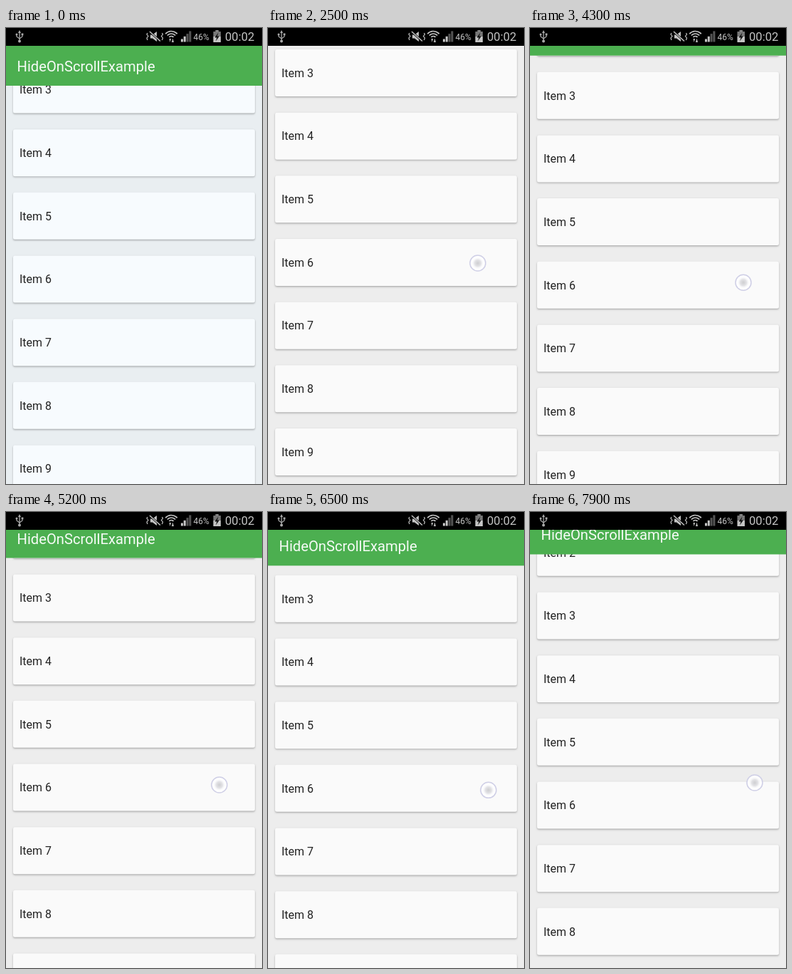
Recreate the animation shown at these times as an HTML page with a canvas. Size 360 by 640 pixels, loop 8 s.

```html
<!DOCTYPE html>
<html lang="en">
<head>
<meta charset="utf-8">
<title>HideOnScrollExample</title>
<style>
html, body { margin: 0; width: 100%; height: 100%; overflow: hidden; background: #ededed; }
canvas { display: block; width: 360px; height: 640px; }
</style>
</head>
<body>
<canvas id="stage" width="360" height="640"></canvas>
<script>
const ctx = document.getElementById('stage').getContext('2d');
const W = 360, H = 640, LOOP = 8000, STEP = 100;
const STATUS_H = 25, BAR_H = 56, SLOP = 8, SNAP_MS = 300;
const CARD_H = 66, PITCH = 88.67, START_Y = 86.5;
const FONT = 'Roboto, "Noto Sans", sans-serif';

// Drags: dy is finger travel, snap is the bar offset reached after release.
const drags = [
  { from: 900,  to: 1775, x: 288, y: 411,   dy: -31.5, pow: 1,    snap: BAR_H },
  { from: 2500, to: 3350, x: 295, y: 330,   dy: 26,    pow: 1,    snap: BAR_H },
  { from: 3700, to: 5625, x: 300, y: 335.5, dy: 54.5,  pow: 1.36, snap: 0 },
  { from: 6000, to: 6896, x: 310, y: 404,   dy: -24.5, pow: 1,    snap: BAR_H },
  { from: 7230, to: 8000, x: 316, y: 337.5, dy: 48.8,  pow: 1,    snap: 0 }
];

const clamp = (v, lo, hi) => Math.min(hi, Math.max(lo, v));
const decelerate = u => 1 - Math.pow(1 - clamp(u, 0, 1), 4);

function poseAt(t) {
  let listY = START_Y, hidden = 0, touch = null;
  for (const d of drags) {
    if (t < d.from) break;
    const u = clamp((t - d.from) / (d.to - d.from), 0, 1);
    const moved = d.dy * (1 - Math.pow(1 - u, d.pow));
    const scrolled = Math.sign(moved) * Math.max(0, Math.abs(moved) - SLOP);
    listY += scrolled;
    hidden = clamp(hidden - scrolled, 0, BAR_H);
    if (t < d.to) touch = { x: d.x, y: d.y + moved };
    else hidden += (d.snap - hidden) * decelerate((t - d.to) / SNAP_MS);
  }
  return { listY, hidden, touch };
}

function rect(x, y, w, h, color) {
  ctx.fillStyle = color;
  ctx.fillRect(x, y, w, h);
}

function label(str, x, y, size, color) {
  ctx.font = size + 'px ' + FONT;
  ctx.fillStyle = color;
  ctx.fillText(str, x, y);
}

function trace(points) {
  ctx.beginPath();
  points.forEach(([x, y]) => ctx.lineTo(x, y));
}

function line(points, color, width) {
  trace(points);
  ctx.strokeStyle = color;
  ctx.lineWidth = width;
  ctx.stroke();
}

function shape(points, color) {
  trace(points);
  ctx.fillStyle = color;
  ctx.fill();
}

function disc(x, y, r, color) {
  ctx.beginPath();
  ctx.arc(x, y, r, 0, Math.PI * 2);
  ctx.fillStyle = color;
  ctx.fill();
}

function roundBox(x, y, w, h, r) {
  ctx.beginPath();
  ctx.moveTo(x + r, y);
  ctx.arcTo(x + w, y, x + w, y + h, r);
  ctx.arcTo(x + w, y + h, x, y + h, r);
  ctx.arcTo(x, y + h, x, y, r);
  ctx.arcTo(x, y, x + w, y, r);
  ctx.closePath();
}

function drawCards(listY, color) {
  for (let i = 1; i <= 10; i++) {
    const mid = listY + (i - 3) * PITCH;
    if (mid < -CARD_H || mid > H + CARD_H) continue;
    ctx.save();
    ctx.shadowColor = 'rgba(0,0,0,0.3)';
    ctx.shadowBlur = 2.5;
    ctx.shadowOffsetY = 1.2;
    roundBox(10, mid - CARD_H / 2, 340, CARD_H, 2.5);
    ctx.fillStyle = color;
    ctx.fill();
    ctx.restore();
    label('Item ' + i, 19, mid + 5.8, 16, '#222');
  }
}

function drawBar(hidden) {
  if (hidden >= BAR_H) return;
  rect(0, STATUS_H - hidden, W, BAR_H, '#4caf50');
  label('HideOnScrollExample', 15.5, 61 - hidden, 20.2, '#f6fbf6');
}

function drawTouch({ x, y }) {
  disc(x, y, 11, 'rgba(255,255,255,0.8)');
  ctx.strokeStyle = '#cfcfe6';
  ctx.lineWidth = 1.5;
  ctx.stroke();
  const glow = ctx.createRadialGradient(x, y, 1, x, y, 8);
  glow.addColorStop(0, 'rgba(205,205,208,0.9)');
  glow.addColorStop(0.5, 'rgba(215,215,220,0.7)');
  glow.addColorStop(1, 'rgba(240,240,245,0)');
  disc(x, y, 8, glow);
}

function drawUsb(c) {
  line([[19, 6], [19, 18]], c, 1.3);
  line([[15, 9], [15, 12], [19, 15], [23, 12], [23, 9]], c, 1.2);
  shape([[19, 3], [21, 7], [17, 7]], c);
  disc(19, 18.5, 2, c);
  disc(15, 9, 1.5, c);
  rect(21.6, 7.5, 2.8, 2.8, c);
}

function drawMute(c) {
  shape([[203, 9.5], [206, 9.5], [212, 5], [212, 19], [206, 14.5], [203, 14.5]], c);
  line([[202, 5], [217, 18.5]], '#000', 3);
  line([[202, 5], [217, 18.5]], c, 1.5);
  for (const [x, s] of [[199, -1], [219.5, 1]]) {
    line([[x, 7], [x + s, 9], [x - s, 11.5], [x + s, 14], [x, 17]], c, 1.2);
  }
}

function drawWifi(c) {
  ctx.strokeStyle = c;
  ctx.lineWidth = 1.7;
  for (const r of [4, 7.5, 11]) {
    ctx.beginPath();
    ctx.arc(232.5, 15.5, r, -Math.PI * 0.77, -Math.PI * 0.23);
    ctx.stroke();
  }
  shape([[229.5, 15], [232, 15], [230.7, 20]], c);
  shape([[233, 20], [236, 20], [234.5, 14.5]], c);
}

function drawSignal(c) {
  for (let i = 0; i < 4; i++) {
    const h = 4 + i * 3.7;
    rect(246 + i * 3.8, 19.5 - h, 3, h, i < 2 ? c : '#555');
  }
}

function drawBattery(c) {
  rect(294.5, 3, 4.5, 2, '#888');
  rect(291.5, 5, 10.5, 7, '#777');
  rect(291.5, 12, 10.5, 8, c);
  shape([[298.5, 6.5], [293.5, 13.5], [296.5, 13.5], [295, 18.5], [300, 11.5], [297, 11.5]], '#111');
}

function drawStatus() {
  const c = '#c4c4c4';
  rect(0, 0, W, STATUS_H, '#000');
  drawUsb('#aaa');
  drawMute(c);
  drawWifi(c);
  drawSignal(c);
  label('46%', 263.5, 17, 12, c);
  drawBattery(c);
  label('00:02', 308, 18, 16.6, c);
}

function draw(t) {
  const pose = poseAt(t);
  const cool = t < drags[0].from;
  rect(0, 0, W, H, cool ? '#e9eef1' : '#ededed');
  drawCards(pose.listY, cool ? '#f7fbfe' : '#fafafa');
  drawBar(pose.hidden);
  drawStatus();
  if (pose.touch) drawTouch(pose.touch);
}

let start = null;
function tick(now) {
  if (start === null) start = now;
  const t = (now - start) % LOOP;
  draw(Math.floor(t / STEP) * STEP);
  requestAnimationFrame(tick);
}
draw(0);
requestAnimationFrame(tick);
</script>
</body>
</html>
```
